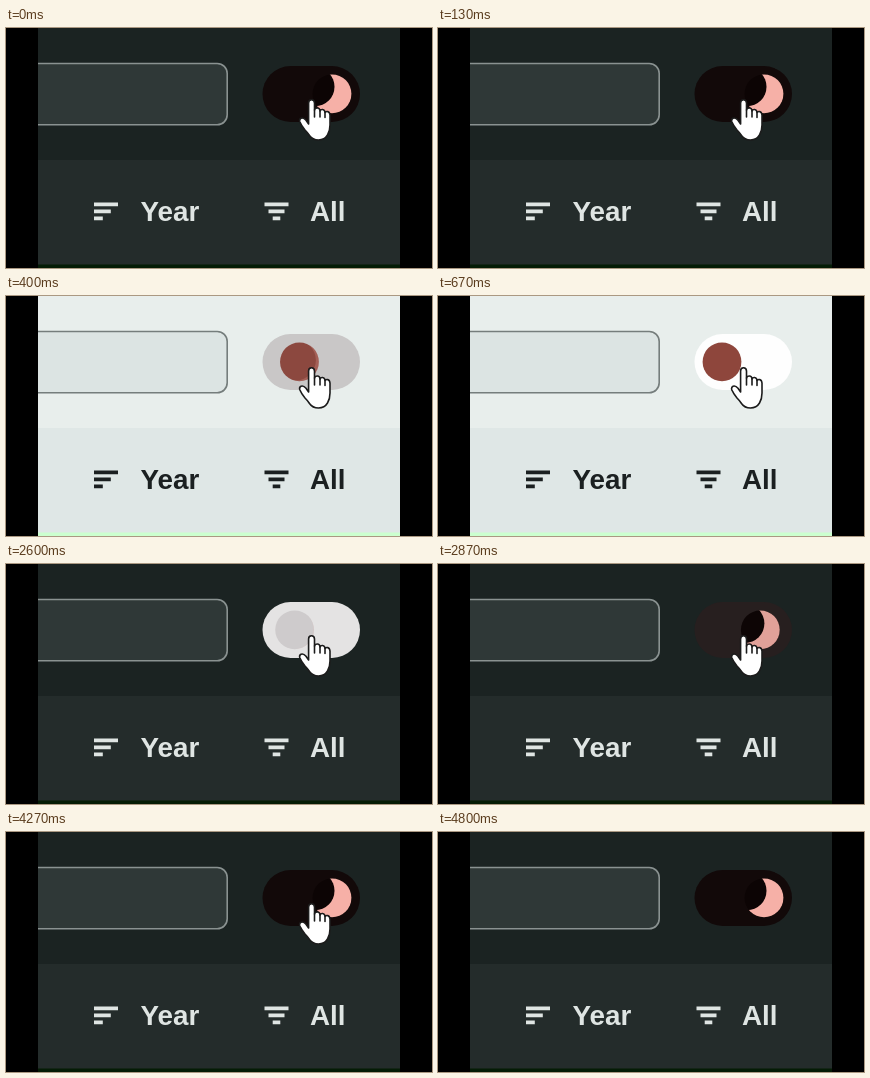
Animation, 426 px wide and 240 px high, one loop 6.79 s. Source, as an HTML page:

```html
<!DOCTYPE html>
<html lang="en">
<head>
<meta charset="utf-8">
<title>Theme switch</title>
<style>
  html, body { margin: 0; height: 100%; overflow: hidden; background: #000; }
  svg {
    display: block; width: 100vw; height: 100vh;
    --top: #e8eeec; --band: #dfe7e6; --line: #ccffcf;
    --field: #dce4e3; --edge: #757d7c; --ink: #1b2021;
  }
  svg.dark {
    --top: #1b2322; --band: #242c2b; --line: #041c05;
    --field: #2f3837; --edge: #8a9291; --ink: #dfe5e3;
  }
  text { font: bold 27.8px "Liberation Sans", Arial, sans-serif; }
  .ink { fill: var(--ink); }
</style>
</head>
<body>
<svg id="stage" viewBox="0 0 426 240">
  <clipPath id="view"><path d="M32 0H394V240H32Z"/></clipPath>
  <mask id="crescent" maskUnits="userSpaceOnUse" x="-25" y="-25" width="50" height="50">
    <path d="M-25-25H25V25H-25Z" fill="#fff"/>
    <circle id="shade"/>
  </mask>
  <g clip-path="url(#view)">
    <path d="M32 0H394V133H32Z" fill="var(--top)"/>
    <path d="M32 132H394V237H32Z" fill="var(--band)"/>
    <path d="M32 236.5H394V240H32Z" fill="var(--line)"/>
    <rect x="0" y="35.5" width="221.2" height="61.3" rx="10" fill="var(--field)" stroke="var(--edge)" stroke-width="1.6"/>
    <g class="ink">
      <path d="M88 174.6h24v3.7h-24zm0 7h16.8v3.7h-16.8zm0 7h8.8v3.7h-8.8z"/>
      <path d="M258.5 174.6h24v3.7h-24zm4 7h16v3.7h-16zm4.2 7h7.6v3.7h-7.6z"/>
      <text x="134.5" y="192.7">Year</text>
      <text x="304" y="192.7">All</text>
    </g>
    <rect id="track" x="256.5" y="38" width="97.5" height="56" rx="28"/>
    <g id="knob">
      <circle r="19.4"/>
      <circle id="moon" r="19.4" fill="#f6b0a7" mask="url(#crescent)"/>
    </g>
    <g id="hand" stroke="#1c1c1c" stroke-width="1.6" stroke-linejoin="round" stroke-linecap="round">
      <path fill="#fff" d="M302.6 96V75Q302.6 71.7 305.5 71.7T308.5 75V82Q309 80 311.4 80T314 83Q314.5 81.2 316.7 81.5T319 84.5Q320 83.2 321.8 83.6T324 87V97Q324 103 321.5 107Q318.5 112 312.5 112T303.5 107.5Q302 105 299 102Q295 97 293.8 93.8Q293 91.3 295 90.3Q297.5 89.3 300 92.3Z"/>
      <path fill="none" d="M308.5 82v7M314 83v6M319 84.5v5"/>
    </g>
  </g>
</svg>
<script>
const LOOP = 6790, FPS = 15, LIGHT_AT = 163, DARK_AT = 2545, FADE = 500;
const $ = id => document.getElementById(id);
const [stage, track, knob, moon, shade, hand] =
  ["stage", "track", "knob", "moon", "shade", "hand"].map($);

// Pointer path: time, dx, dy
const path = [[4270, 0, 0], [4333, 15, -19], [4466, -25, -3],
              [4680, -25, -3], [4733, 8, -4]];
const GONE_AT = 4795;

const clamp = v => Math.min(1, Math.max(0, v));
const mix = (a, b, k) => a + (b - a) * k;
const blend = (a, b, k) => `rgb(${a.map((v, i) => Math.round(mix(v, b[i], k)))})`;

// cubic-bezier(.25, .1, .25, 1)
function ease(x) {
  x = clamp(x);
  let lo = 0, hi = 1, s = 0.5;
  const curve = (a, b) => 3 * (1 - s) ** 2 * s * a + 3 * (1 - s) * s * s * b + s ** 3;
  for (let i = 0; i < 20; i++) {
    s = (lo + hi) / 2;
    if (curve(.25, .25) < x) lo = s; else hi = s;
  }
  return x === 0 || x === 1 ? x : curve(.1, 1);
}

function pointer(t) {
  const i = path.findIndex(p => p[0] > t);
  if (i === 0) return [0, 0];
  if (i < 0) return path[path.length - 1].slice(1);
  const [t0, x0, y0] = path[i - 1], [t1, x1, y1] = path[i];
  const k = (t - t0) / (t1 - t0);
  return [mix(x0, x1, k), mix(y0, y1, k)];
}

function draw(t) {
  const dark = t < LIGHT_AT || t >= DARK_AT;
  // 1 is the moon on the right, 0 the sun on the left
  const m = t < DARK_AT ? 1 - ease((t - LIGHT_AT) / FADE) : ease((t - DARK_AT) / FADE);
  stage.classList.toggle("dark", dark);
  track.setAttribute("fill", blend([254, 254, 254], [18, 9, 9], m));
  knob.setAttribute("transform", `translate(${284 + 42 * m} 65.8)`);
  knob.setAttribute("fill", dark
    ? blend([233, 230, 231], [12, 4, 4], clamp(m * 1.09))
    : blend([142, 70, 60], [134, 80, 74], m));
  moon.setAttribute("opacity", m);
  shade.setAttribute("cx", -17 * m);
  shade.setAttribute("cy", -7 * m);
  shade.setAttribute("r", 20.5 - m);
  hand.setAttribute("transform", `translate(${pointer(t)})`);
  hand.setAttribute("visibility", t < GONE_AT ? "visible" : "hidden");
}

const start = performance.now();
function tick() {
  const t = (performance.now() - start) % LOOP;
  // Hold each pose for one step of a 15 fps clock
  draw(Math.floor(t * FPS / 1000 + 0.06) * 1000 / FPS);
  requestAnimationFrame(tick);
}
tick();
</script>
</body>
</html>
```
